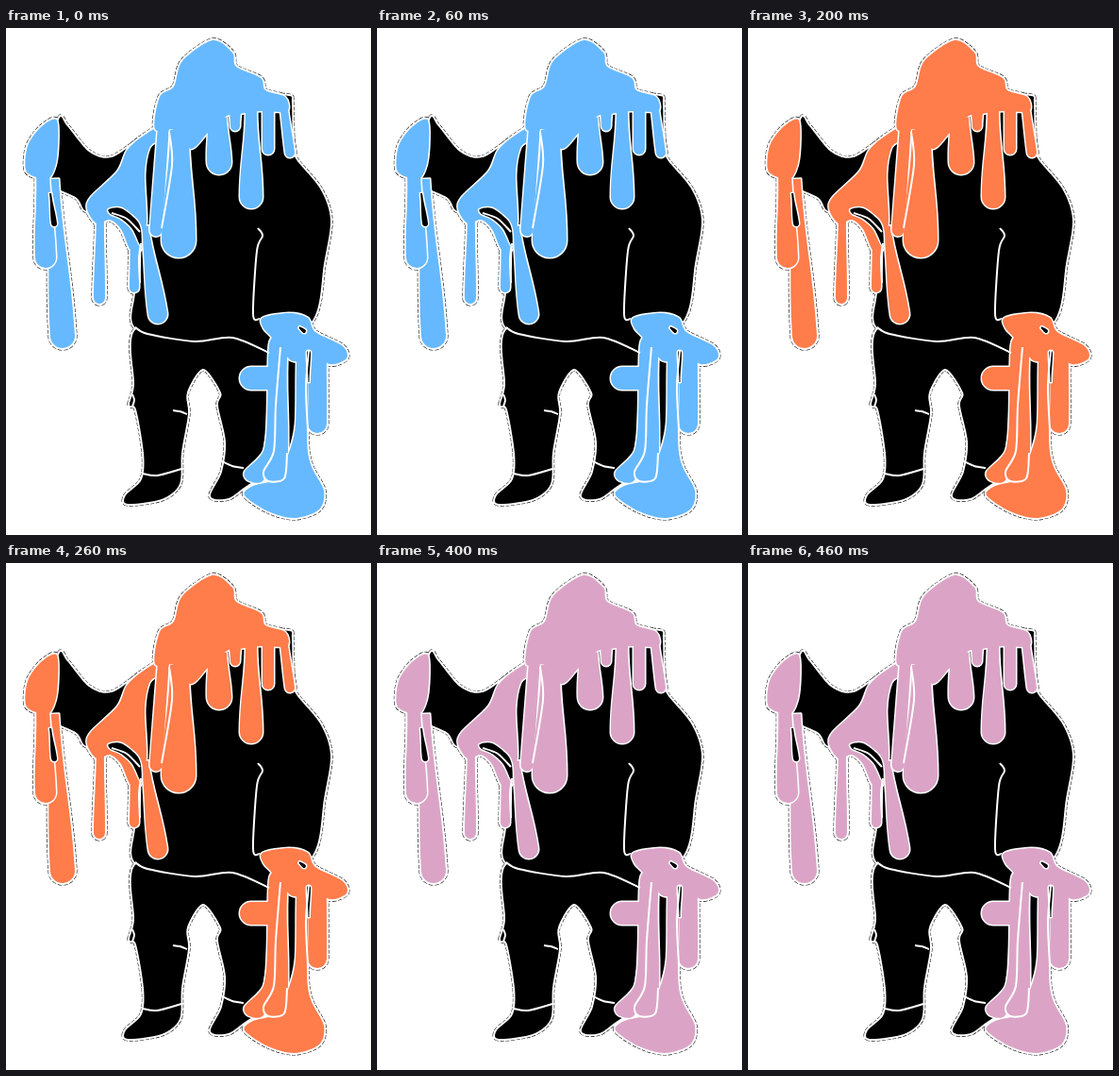
Animation of 387 by 537 pixels, one loop 0.5 s. Source, as an HTML page with a canvas:

```html
<!DOCTYPE html>
<html lang="en">
<head>
<meta charset="utf-8">
<title>Slime figure</title>
<style>
html, body { margin: 0; width: 100%; height: 100%; overflow: hidden; background: #fff; }
canvas { display: block; }
</style>
</head>
<body>
<canvas id="stage" width="387" height="537"></canvas>
<script>
const ctx = document.getElementById('stage').getContext('2d');
const slimeColors = ['#66b9ff', '#ffeb20', '#ff7c4b', '#93ff80', '#dba4c6'];
const frameTime = 100;

// Smooth curve through a few x, y pairs
function curve(closed, xy) {
  const n = xy.length / 2, path = new Path2D(), k = 0.15;
  const at = i => {
    const j = closed ? (i + n) % n : Math.max(0, Math.min(n - 1, i));
    return [xy[2 * j], xy[2 * j + 1]];
  };
  path.moveTo(...at(0));
  for (let i = 0; i < (closed ? n : n - 1); i++) {
    const [a, b, c, d] = [at(i - 1), at(i), at(i + 1), at(i + 2)];
    path.bezierCurveTo(b[0] + (c[0] - a[0]) * k, b[1] + (c[1] - a[1]) * k,
      c[0] - (d[0] - b[0]) * k, c[1] - (d[1] - b[1]) * k, ...c);
  }
  if (closed) path.closePath();
  return path;
}
const blob = (...xy) => curve(true, xy);
const line = (...xy) => curve(false, xy);

// Drop running from a neck of half width w to a round end of radius r
function drip(x0, y0, x1, y1, w, r) {
  const path = new Path2D(), a = Math.atan2(y1 - y0, x1 - x0);
  const nx = -Math.sin(a), ny = Math.cos(a);
  const dx = (x1 - x0) * 0.4, dy = (y1 - y0) * 0.4;
  path.moveTo(x0 + nx * w, y0 + ny * w);
  path.bezierCurveTo(x0 + nx * w + dx, y0 + ny * w + dy,
    x1 + nx * r - dx, y1 + ny * r - dy, x1 + nx * r, y1 + ny * r);
  path.arc(x1, y1, r, a + Math.PI / 2, a - Math.PI / 2, true);
  path.bezierCurveTo(x1 - nx * r - dx, y1 - ny * r - dy,
    x0 - nx * w + dx, y0 - ny * w + dy, x0 - nx * w, y0 - ny * w);
  path.closePath();
  return path;
}

const raisedArm = blob(56, 97, 65, 104, 88, 131, 112, 137, 150, 115, 148, 150,
  120, 190, 86, 194, 75, 180, 45, 159);
const torso = blob(170, 105, 270, 75, 300, 72, 303, 80, 304, 120, 307, 138, 333, 170,
  344, 203, 337, 250, 326, 308, 279, 344, 200, 334, 138, 318, 137, 280, 144, 220, 150, 130);
const trousers = blob(138, 319, 210, 325, 306, 340, 306, 455, 258, 483, 236, 498,
  217, 496, 229, 470, 233, 438, 225, 400, 228, 386, 209, 361, 192, 386, 193, 409,
  186, 450, 184, 483, 165, 499, 129, 504, 127, 495, 144, 478, 146, 450, 138, 404,
  131, 399, 136, 378);
const body = [raisedArm, torso, trousers];

// Each layer is one merged mass with its own rim
const slime = [
  [drip(50, 160, 60, 326, 6, 13)],
  [ // raised hand
    blob(54, 98, 37, 105, 23, 125, 21, 150, 32, 158, 46, 159, 54, 138),
    drip(39, 153, 42, 243, 7, 11)
  ],
  [ // shoulder
    blob(164, 104, 143, 116, 128, 130, 118, 152, 90, 179, 86, 192, 96, 207, 110, 203,
      122, 213, 132, 235, 143, 235, 149, 205, 147, 155, 152, 127, 162, 118),
    drip(100, 198, 99, 286, 4, 6),
    drip(137, 225, 136, 275, 5, 5),
    drip(147, 210, 161, 303, 4, 10)
  ],
  [ // head
    blob(158, 107, 163, 73, 178, 62, 187, 35, 219, 13, 240, 26, 244, 41, 270, 53,
      275, 66, 296, 73, 298, 88, 270, 88, 247, 91, 234, 93, 214, 111, 196, 128, 178, 108),
    drip(167, 104, 159, 214, 6, 6.5),
    drip(184, 108, 183, 225, 10, 18),
    drip(224, 95, 226, 142, 10, 13),
    drip(243, 86, 243, 104, 6, 5),
    drip(260, 86, 260, 179, 6, 12),
    drip(278, 80, 278, 128, 6, 6),
    drip(294, 80, 301, 132, 4, 5)
  ],
  [ // lowered hand and puddle
    blob(272, 307, 300, 302, 320, 307, 328, 322, 357, 337, 361, 350, 343, 356,
      324, 340, 316, 352, 302, 352, 290, 338, 280, 341, 283, 330, 273, 318),
    drip(331, 340, 330, 419, 9, 10),
    drip(283, 371, 260, 371, 12, 12),
    blob(279, 335, 277, 410, 273, 448, 253, 470, 258, 480, 273, 479, 284, 448, 288, 400, 290, 335),
    drip(295, 335, 285, 468, 4, 13),
    blob(309, 342, 307, 420, 298, 455, 285, 478, 262, 485, 253, 495, 278, 512, 306, 519,
      332, 510, 337, 490, 323, 462, 319, 430, 321, 342)
  ]
];

const holes = [
  blob(109, 192, 122, 191, 138, 203, 143, 214, 143, 231, 134, 213, 122, 202, 111, 197),
  drip(47, 175, 51, 207, 1, 3),
  drip(311, 317, 316, 321, 1, 2),
  drip(321, 375, 321, 344, 0.5, 2)
];

const lines = [
  line(137, 317, 150, 324, 200, 332, 240, 328, 279, 344),
  line(267, 212, 272, 220, 266, 236, 262, 303, 269, 308),
  line(145, 472, 160, 474, 186, 467),
  line(229, 459, 240, 464, 252, 466),
  line(177, 405, 184, 406, 192, 409),
  line(134, 388, 136, 394, 134, 401),
  line(112, 196, 128, 202, 142, 216),
  line(143, 228, 141, 245, 142, 270),
  line(173, 110, 176, 145, 165, 212),
  line(291, 338, 286, 400, 284, 448, 273, 470, 278, 480, 295, 477, 298, 450),
  line(320, 425, 318, 380, 321, 342)
];

function stroke(paths, color, width, dash = []) {
  ctx.strokeStyle = color;
  ctx.lineWidth = width;
  ctx.setLineDash(dash);
  paths.forEach(p => ctx.stroke(p));
}

function fill(paths, color) {
  ctx.fillStyle = color;
  paths.forEach(p => ctx.fill(p));
}

function draw(slimeColor) {
  ctx.fillStyle = '#fff';
  ctx.fillRect(0, 0, 387, 537);
  ctx.lineJoin = 'round';
  const figure = [...body, ...slime.flat()];
  stroke(figure, '#222', 5.2, [4, 1.5]);
  stroke(figure, '#fff', 4);
  fill(body, '#000');
  for (const layer of slime) {
    stroke(layer, '#fff', 3);
    fill(layer, slimeColor);
  }
  stroke(holes, '#fff', 3);
  fill(holes, '#000');
  stroke(lines, '#fff', 2);
}

let shown = -1;
function tick() {
  const step = Math.floor(performance.now() / frameTime) % slimeColors.length;
  if (step !== shown) draw(slimeColors[shown = step]);
  requestAnimationFrame(tick);
}
tick();
</script>
</body>
</html>
```
